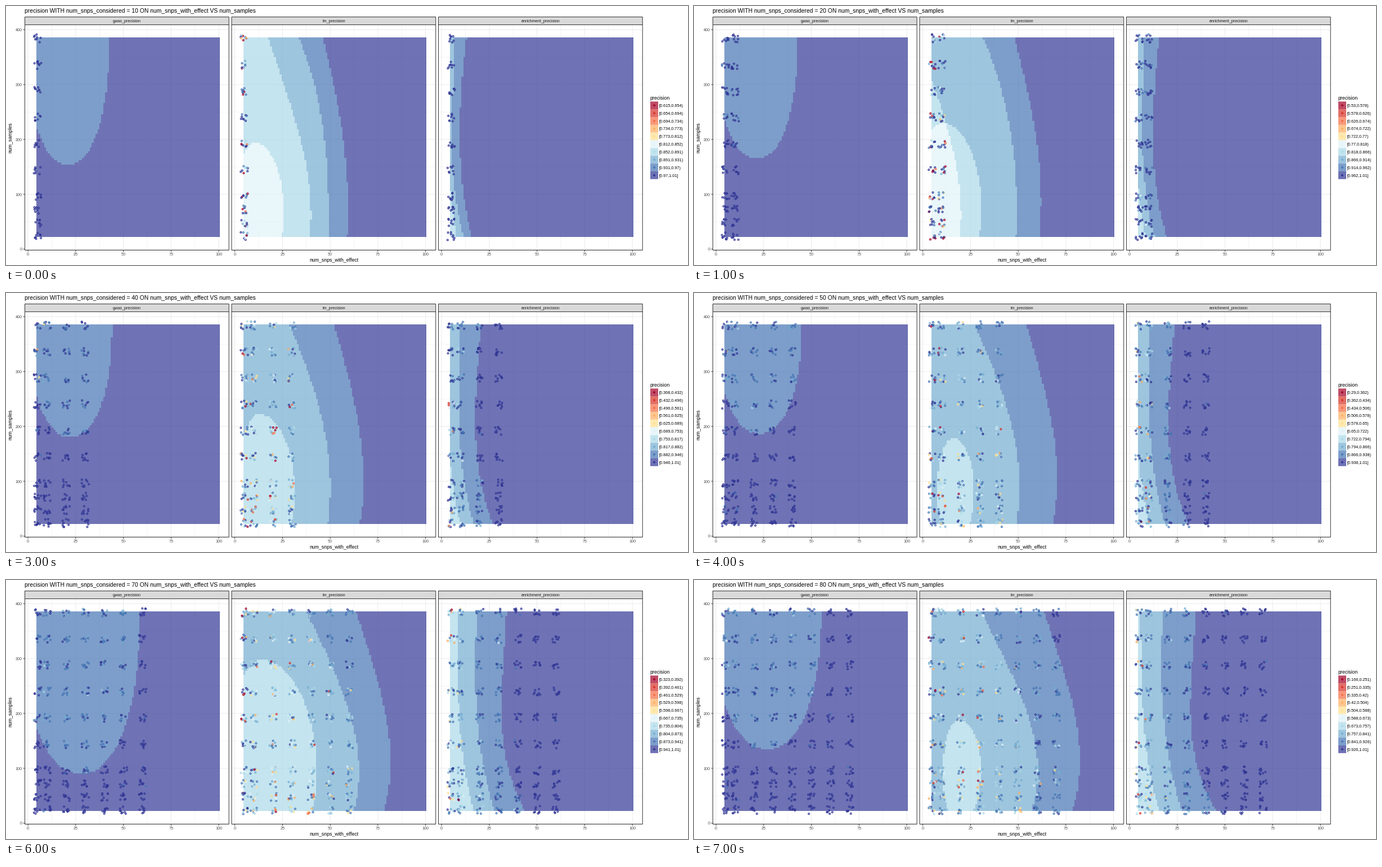
Animation, 1212 px wide and 462 px high, one loop 8000 ms. Source, as a matplotlib script:

```python
import numpy as np
import matplotlib
import matplotlib.pyplot as plt
from matplotlib.animation import FuncAnimation
from matplotlib.colors import to_rgba
from matplotlib.patches import Rectangle

matplotlib.rcParams["font.family"] = "Liberation Sans"
matplotlib.rcParams["path.snap"] = False

W, H, DPI = 1212, 462, 100
PX = 72 / DPI  # points per pixel
TOP, BOTTOM, STRIP = 33.5, 435.5, 19.5
PANELS = {"gwas_precision": 33.5, "lm_precision": 401, "enrichment_precision": 768.5}
PANEL_W = 362.7
COLORS = ["#a50026", "#d73027", "#f46d43", "#fdae61", "#fee090",
          "#e0f3f8", "#abd9e9", "#74add1", "#4575b4", "#313695"]
RGBA = np.array([to_rgba(c) for c in COLORS])

xs = np.arange(5, 101)
ys = np.arange(384, 23, -4)
GX, GY = np.meshgrid(xs, ys)
DEPTH = (386 - GY) / 364
SAMPLES = [24, 48, 72, *range(96, 385, 48)]

# per step: lowest precision, lowest point of the bowl, highest point of the blob
STEPS = range(10, 81, 10)
LOWEST = [0.615, 0.53, 0.445, 0.368, 0.29, 0.2566, 0.3234, 0.16645]
BOWL_LOW = [154, 165, 175, 181, 187, 160, 90, 135]
BLOB_TOP = [194, 230, 270, 222, 178, 195, 298, 188]


def ellipse(cx, left, right, cy, up, down, power=2.0):
    dx = abs(GX - cx) / np.where(GX < cx, left, right)
    dy = abs(GY - cy) / np.where(GY > cy, up, down)
    return (dx ** power + dy ** power < 1).astype(int)


def inside(n, first, last, shift):
    """Cells left of a contour that drifts from its first to its last shape."""
    x = np.array(first) + (np.array(last) - first) * (n - 10) / 70 + shift
    curve = np.polyfit(np.linspace(0, 1, 4), x, 3)
    return (GX < np.polyval(curve, DEPTH)).astype(int)


def gwas(n, low):
    start, end = 0.042 * low - 7, 58 + 0.15 * n - 0.11 * low
    r = (end - start) / 2
    return ellipse(start + r, r, r, 386, 1000, 386 - low, 2.2)


def lm(n, top, excess):
    cx = 17 + 0.12 * n - 0.04 * top
    cy = 62 + 0.4 * n
    right = 1.6 + 0.08 * n + 0.12 * top - cx
    up = top - cy
    blob = ellipse(cx, 3.5 + 0.45 * right, right, cy, up, 40 + 0.6 * up)
    inner = [17.5, 29, 37.9, 39.4]
    return (blob + inside(n, inner, np.array(inner) - 140, 0)
            + inside(n, [34.7, 45.3, 49.7, 50.6], [30.5, 47.3, 58.9, 56.8], 70 * excess)
            + inside(n, [46.5, 54.4, 59.1, 59.4], [63.6, 74.8, 81.9, 78.3], 28 * excess))


def enrichment(n, excess):
    shift = 28 * excess
    return (inside(n, [4.2, 4.2, 4.8, 8.4], [5.6, 6.3, 8.5, 15.5], shift)
            + inside(n, [6.5, 6.4, 6.6, 12.2], [17.6, 16.7, 19.5, 27.3], shift)
            + inside(n, [13.6, 10.6, 10.9, 16.3], [34.5, 32.4, 33.2, 45.5], shift))


def surfaces(i):
    """Steps below the top colour, for each panel."""
    n = STEPS[i]
    excess = LOWEST[i] - (0.7 - 0.0067 * n)
    return [gwas(n, BOWL_LOW[i]), lm(n, BLOB_TOP[i], excess), enrichment(n, excess)]


def to_x(left, v):
    return left + 5.6 + 3.39 * np.asarray(v)


def to_y(v):
    return 433.8 - 0.979 * np.asarray(v)


def jittered(n, drops):
    """Replicate points around every tested pair of settings."""
    rng = np.random.default_rng(n)
    pos, cols = [], []
    for name, left, drop in zip(PANELS, PANELS.values(), drops):
        weight = 1 if name == "lm_precision" else 0.7 * min(1, (n - 10) / 40)
        for e in [5, *range(10, n, 10)]:
            shape = np.clip(e * n / 400, 0.25, 2)
            for s in SAMPLES:
                mean = weight * (drop[(384 - s) // 4, e - 5] + 0.25)
                fall = mean * rng.gamma(shape, 1 / shape, 8)
                level = np.clip(np.rint(9 - fall), 0, 9).astype(int)
                x = to_x(left, e + rng.uniform(-1.9, 1.9, 8))
                y = to_y(s + rng.uniform(-7.4, 7.4, 8))
                pos.append(np.column_stack([x, y]))
                cols.append(RGBA[level])
    return np.vstack(pos), np.vstack(cols)


fig = plt.figure(figsize=(W / DPI, H / DPI), dpi=DPI, facecolor="white")
ax = fig.add_axes([0, 0, 1, 1])
ax.axis("off")


def text(x, y, s, size=7.3, color="black", ha="center", **kw):
    """Text whose capitals are centred on y."""
    return ax.text(x, y + 0.36 * size, s, fontsize=size * PX, color=color,
                   ha=ha, va="baseline", **kw)


def line(x, y, color, width=1.0, z=1):
    ax.plot(x, y, color=color, lw=width * PX, zorder=z, solid_capstyle="butt")


def box(x, y, w, h, face, edge="none", z=1, **kw):
    ax.add_patch(Rectangle((x, y), w, h, facecolor=face, edgecolor=edge,
                           lw=PX, zorder=z, **kw))


images = []
for name, left in PANELS.items():
    right = left + PANEL_W
    for i in range(9):
        major = i % 2 == 0
        grid = dict(color="#ebebeb", width=1.0 if major else 0.5)
        gx, gy = to_x(left, 12.5 * i), to_y(50 * i)
        line([gx, gx], [TOP, BOTTOM], **grid)
        line([left, right], [gy, gy], **grid)
        if major:
            line([gx, gx], [BOTTOM, BOTTOM + 3], "#333333")
            text(gx, 442.3, f"{12.5 * i:g}", color="#4d4d4d")
    extent = np.rint([*to_x(left, [4.5, 100.5]), *to_y([22, 386])])
    images.append(ax.imshow(np.zeros((len(ys), len(xs), 4)), extent=extent,
                            aspect="auto", interpolation="nearest", zorder=2))
    box(left, TOP, PANEL_W, BOTTOM - TOP, "none", "#333333", z=5)
    box(left, STRIP, PANEL_W, TOP - STRIP, "#d9d9d9", "#333333", z=5)
    text(left + PANEL_W / 2, 26.5, name, color="#1a1a1a", zorder=6)

for v in range(0, 401, 100):
    line([30.5, 33.5], [to_y(v)] * 2, "#333333")
    text(29, to_y(v), str(v), color="#4d4d4d", ha="right")

title = text(33, 8.2, "", 10.4, ha="left")
text(582.5, 452.8, "num_snps_with_effect", 8.75)
ax.text(7.5, 234.5, "num_samples", fontsize=8.75 * PX, rotation=90,
        ha="center", va="center")
text(1144.5, 163.5, "precision", 8.75, ha="left")

KEY, KEY_TOP = 13.84, 170.4
labels = []
for i, c in enumerate(COLORS):
    y = KEY_TOP + KEY * i
    box(1145, y, 14, KEY, c, alpha=0.7, snap=True)
    labels.append(text(1160.5, y + KEY / 2, "", ha="left"))
ax.scatter([1152] * 10, KEY_TOP + KEY * (np.arange(10) + 0.5), s=(3.2 * PX) ** 2,
           c=COLORS, linewidths=0.4, zorder=3)
dots = ax.scatter([], [], s=(3 * PX) ** 2, linewidths=PX, zorder=4)

ax.set_xlim(0, W)
ax.set_ylim(H, 0)


def draw(i):
    n, low = STEPS[i], LOWEST[i]
    drops = surfaces(i)
    for image, drop in zip(images, drops):
        tiles = RGBA[9 - drop]
        tiles[..., 3] = 0.7
        image.set_data(tiles)

    pos, cols = jittered(n, drops)
    dots.set_offsets(pos)
    dots.set_edgecolors(cols)
    dots.set_facecolors(cols * [1, 1, 1, 0.4])

    title.set_text(f"precision WITH num_snps_considered = {n} "
                   "ON num_snps_with_effect VS num_samples")
    cuts = [f"{low + k * ((1.01 - low) / 10):.3g}" for k in range(11)]
    for k, label in enumerate(labels):
        label.set_text(f"[{cuts[k]},{cuts[k + 1]}" + ("]" if k == 9 else ")"))
    return [*images, dots, title, *labels]


anim = FuncAnimation(fig, draw, frames=len(STEPS), interval=1000,
                     repeat=True, repeat_delay=0, blit=False)
plt.show()
```
